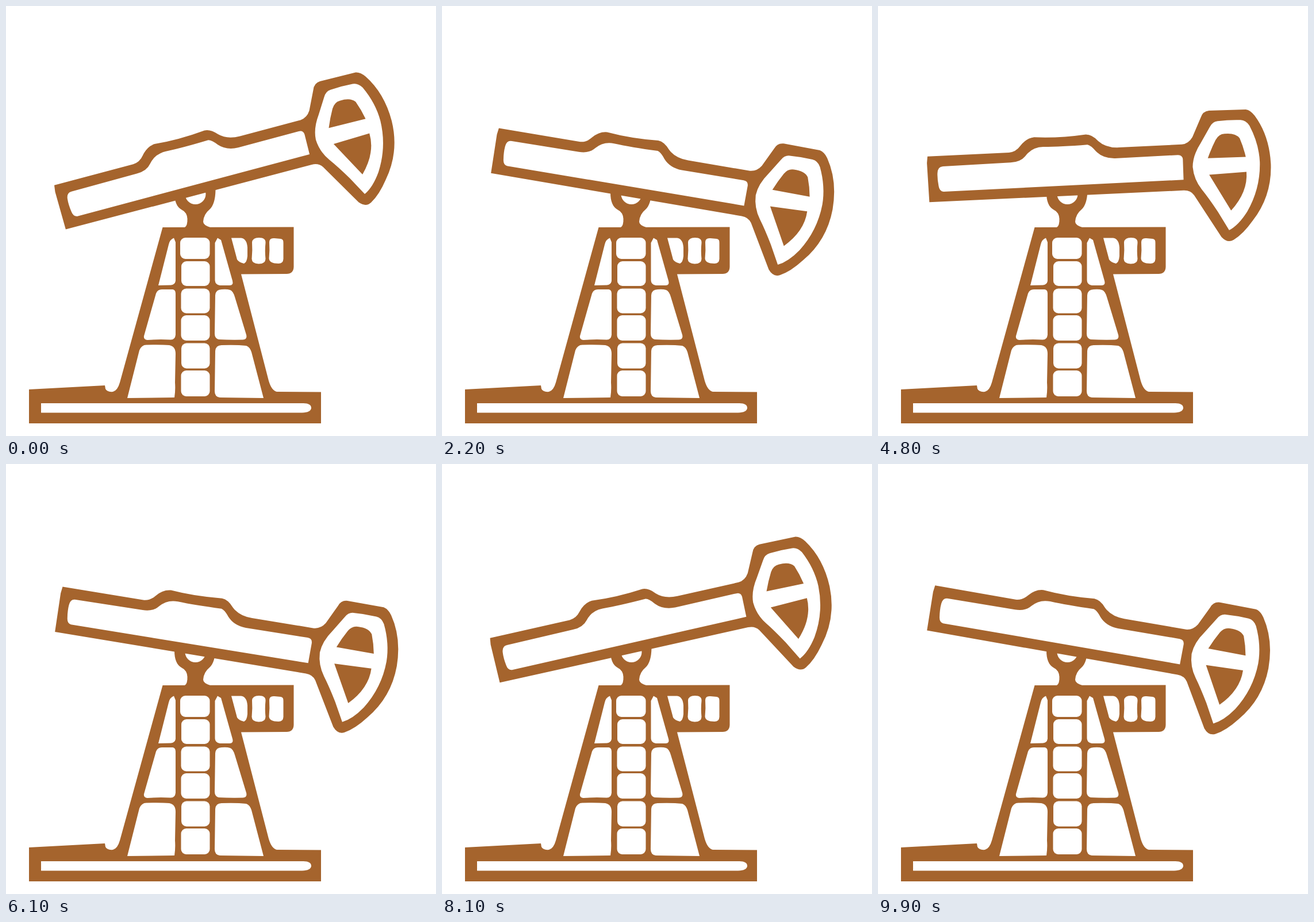
These frames come from a looping animation (748x748 px, 10 s). An HTML page:

```html
<!DOCTYPE html>
<html lang="en">
<head>
<meta charset="utf-8">
<title>Pump jack</title>
<style>
html, body { margin: 0; height: 100%; overflow: hidden; background: #fff; }
svg { display: block; width: 100vw; height: 100vh; fill: #a5642d; }
.hole { fill: #fff; }
</style>
</head>
<body>
<svg viewBox="0 0 748 748">
  <!-- base and tower -->
  <path d="M40 667L172 660L173 666Q176 672 186 671Q194 669 198 655L272.500 385L500.500 384.500V454Q500 466 488 466L409 466.500L457 652Q462 669 471 671L548 671.500V726H40Z"/>
  <g class="hole">
    <path d="M61 691H514Q531 690 531 699.500Q530 707 515 707.500H61Z"/>
    <g id="ladder"></g>
    <path d="M292 403.500L295 411V478Q294 485 287 485.500L265 486L283 415Q285 406 292 403.500Z"/>
    <path d="M261 500Q264 492 273 493H290Q295 494 295 500V572Q294 581 286 580.500Q265 579.500 246 581Q239 580 240 574Z"/>
    <path d="M232 599Q236 589 245 589.500Q270 589 284 590Q295 592 295 605L294 655Q295 668 293 681L211 682Z"/>
    <path d="M368 403.500L374 407L394 478Q396 486 389 486H372Q364 485 363.500 477V412Z"/>
    <path d="M364 503Q365 493 375 493Q384 492 390 494Q395 496 398 506L418 572Q420 580 412 580.500Q390 581 370 580Q363 578 363 570Z"/>
    <path d="M364 600Q365 590 375 590Q400 589 418 591Q424 593 427 602L448 682L372 681Q363 680 363 670Z"/>
    <path d="M392 403.500H409Q419 405 420 420V435Q419 446 414 448Q405 446 402 441Z"/>
    <path d="M428 411Q429 403 440 403Q452 403 451.500 412Q450 425 451.500 440Q451 449 439 448.500Q428 448 427.500 440Q429 425 428 411Z"/>
    <path d="M458 411Q458 403 467 404L478 405Q483 406 482.500 412V440Q482 448 474 448Q458 448 457.500 439Q459 425 458 411Z"/>
  </g>
  <!-- bearing -->
  <path d="M293 325Q293 347 305 354Q315 359 315.500 370Q316 382 311 385L355 385Q343 381 343 375Q344 362 354 354Q364 345 364.500 320Z"/>
  <circle class="hole" cx="329.500" cy="327" r="18"/>
  <!-- walking beam -->
  <g id="beam">
    <path d="M88 250.500H230Q242 250 250 240Q261 227 275 226Q318 230 365 225.500Q376 226 386 238Q399 251 422 251H531Q543 250 550 239L566 206Q570 195 581 194.500L645 195.500Q653 197 660 207Q684 243 684 293Q683 348 648 389Q630 412 613 421Q602 427 592 415L548 340Q542 331 530 331L87.500 330L86.500 262Z"/>
    <g class="hole">
      <path d="M114 269L232 268Q250 268 259 257Q271 243 290 243.500Q320 245 367 243.500Q373 245 381 255.500Q393 269 414 269.500L523 269Q531 269 531.500 277L531 312.500L113 313Q106 312 105 303Q103 290 104 280Q105 269 114 269Z"/>
      <path d="M548 291Q549 271 564 250L581 223Q586 214 595 213.500Q615 212 635 213.500Q644 214 650 224Q665 256 665 288Q664 334 639 373Q623 396 606 404L588 371Q573 346 562 331Q549 313 548 291Z"/>
    </g>
    <path d="M575 277Q582 260 590 246Q596 236 606 236Q625 235 632 245Q638 261 641 278Z"/>
    <path d="M576 306L641 304Q642 339 611 370Z"/>
  </g>
</svg>
<script>
const beam = document.getElementById('beam');
const LOOP = 10000, STEP = 100, PERIOD = 3868;

// ladder openings: left, top, bottom
document.getElementById('ladder').innerHTML = [
  [303, 403, 440], [305, 444, 487], [304.5, 491.5, 534.5],
  [304.5, 538, 582], [305, 586.5, 630.5], [304.5, 634, 679]
].map(([x, y, b]) =>
  `<rect x="${x}" y="${y}" width="${354.5 - x}" height="${b - y}" rx="9"/>`).join('');

function draw(now) {
  const t = Math.floor(now % LOOP / STEP) * STEP;
  const angle = -2.05 - 12.82 * Math.cos(2 * Math.PI * t / PERIOD);
  beam.setAttribute('transform', `rotate(${angle} 320.3 296.5)`);
  requestAnimationFrame(draw);
}
draw(0);
</script>
</body>
</html>
```
